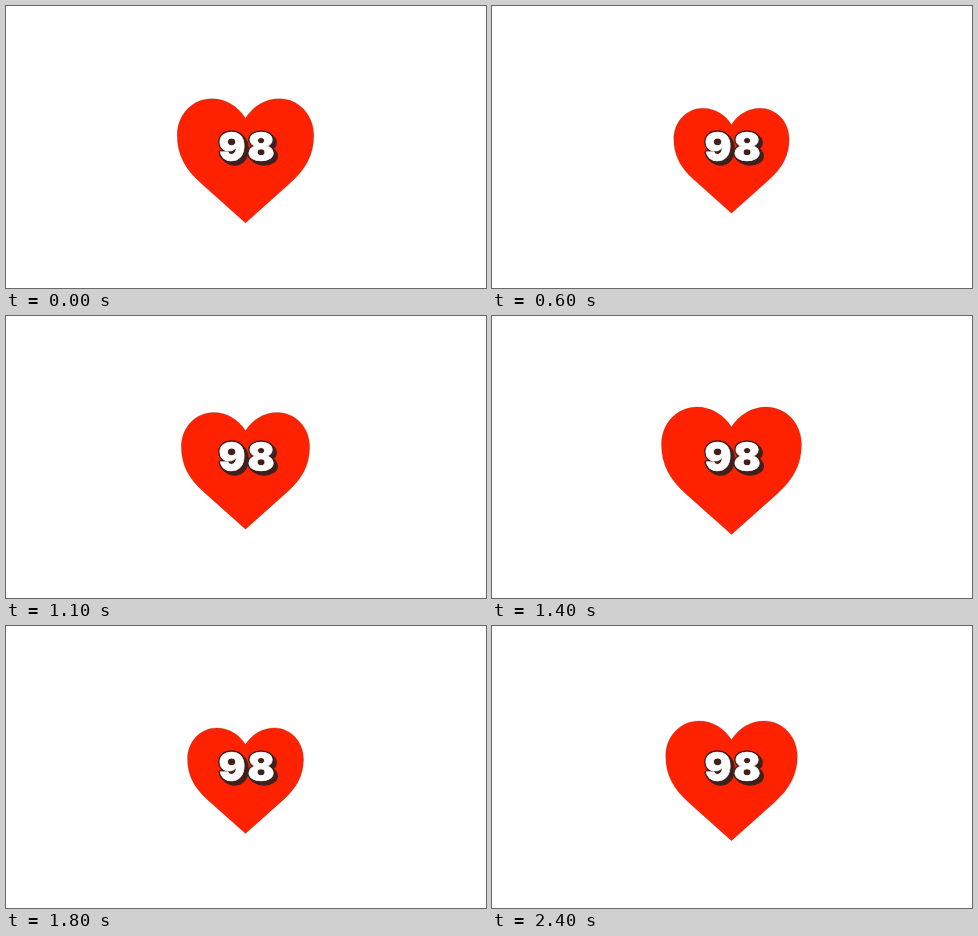
These frames come from a looping animation (480 by 282 pixels, 2500 ms). An HTML page:

```html
<!DOCTYPE html>
<html lang="en">
<head>
<meta charset="utf-8">
<title>Heartbeat</title>
<style>
  html, body { margin: 0; width: 100%; height: 100%; overflow: hidden; background: #fff; }
  svg { display: block; width: 480px; height: 282px; }
  #heart { fill: #ff2200; stroke: #401808; stroke-opacity: .4; stroke-width: .5; vector-effect: non-scaling-stroke; }
  text {
    font: 900 40px Inter, Roboto, sans-serif; font-optical-sizing: none; letter-spacing: 2px;
    text-anchor: middle; fill: #fff; stroke: #fff; stroke-width: .7; stroke-linejoin: round;
  }
  #depth text { fill: #40201c; stroke: #40201c; stroke-width: 3.4; }
</style>
</head>
<body>
<svg viewBox="0 0 480 282">
  <path id="heart" d="M12 21.35L5.5 15.55C3.2 13.5 2 11.4 2 8.5C2 5.5 4.2 3.15 7.05 3.15c2.05 0 3.85 1.1 4.95 2.85C13.1 4.25 14.9 3.15 16.95 3.15C19.8 3.15 22 5.5 22 8.5C22 11.4 20.8 13.5 18.5 15.55z"/>
  <g id="depth"></g>
  <text x="241.5" y="155">98</text>
</svg>
<script>
const LOOP = 2500, BEAT = 1250, STEP = 100;
const SMALL = 114, REST = 115.4, LARGE = 140.2;
const heart = document.getElementById('heart');

// Extruded shadow behind the number
document.getElementById('depth').innerHTML = [0, 1, 2, 3]
  .map(d => `<text x="${241.5 + d}" y="${155 + d}">98</text>`).join('');

const mix = (a, b, p) => a + (b - a) * p;
const smooth = p => p * p * (3 - 2 * p);
const swell = p => 1 - (1 - p) ** 2.1;

// Heart width in pixels: quick swell, quick fall, slow tail
function widthAt(ms) {
  const t = ms % BEAT;
  if (t < 200) return mix(SMALL, LARGE, swell((t + 310) / 510));
  if (t < 260) return LARGE;
  if (t < 580) return mix(LARGE, REST, smooth((t - 260) / 320));
  if (t < 940) return mix(REST, SMALL, (t - 580) / 360);
  return mix(SMALL, LARGE, swell((t - 940) / 510));
}

const start = performance.now();
function draw() {
  const t = (performance.now() - start) % LOOP;
  const scale = widthAt(Math.floor(t / STEP) * STEP) / 20;
  heart.setAttribute('transform', `translate(239.5 154.3) scale(${scale}) translate(-12 -12.175)`);
  requestAnimationFrame(draw);
}
draw();
</script>
</body>
</html>
```
